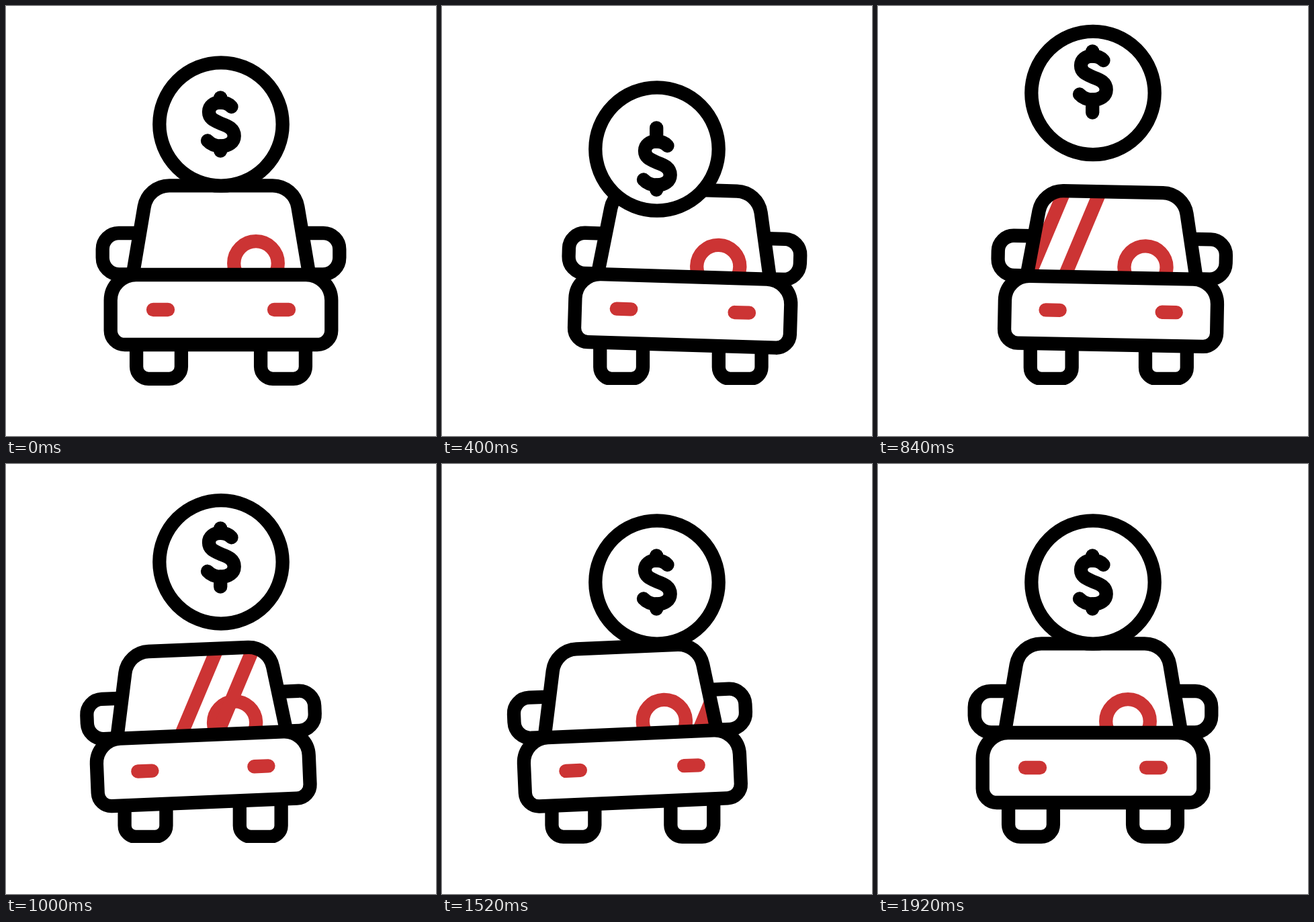
An HTML page with a canvas for the animation above (2 s loop, 640 px wide and 640 px high).

```html
<!DOCTYPE html>
<html lang="en">
<head>
<meta charset="utf-8">
<title>Car and coin</title>
<style>
html, body { margin: 0; width: 100%; height: 100%; overflow: hidden; background: #fff; }
canvas { display: block; width: 100%; height: 100%; }
</style>
</head>
<body>
<canvas id="stage" width="640" height="640"></canvas>
<script>
const ctx = document.getElementById('stage').getContext('2d');
const LOOP = 2000, STEP = 40;
const BLACK = '#000', RED = '#cc3434', WHITE = '#fff';
const LINE = 20.3;
const BASE = 504;  // height of the car's pivot
const PIVOT = -14; // tilt pivot, left of the car's middle

// Keyframes as [time, value], eased in and out between neighbours
const moves = {
  carX: [[80, 320], [640, 380.8], [1200, 260.4], [1920, 320]],
  scale: [[80, 1], [640, 0.962], [1200, 0.962], [1920, 1]],
  tilt: [[80, 0], [640, 2.9], [680, 2.9], [1200, -5], [1840, 0]],
  coin: [[80, 0], [400, 37], [820, -46.5], [840, -46.5], [1240, 0]],
  sign: [[80, 0], [400, 58], [820, -69], [840, -69], [1240, 11.3], [1480, 0]],
  topLag: [[80, 0], [400, -13], [820, 0]],
  lowLag: [[400, 0], [820, 12], [840, 12], [1240, 0]]
};

function at(keys, t) {
  if (t <= keys[0][0]) return keys[0][1];
  for (let i = 1; i < keys.length; i++) {
    const [t0, a] = keys[i - 1], [t1, b] = keys[i];
    if (t < t1) {
      const u = (t - t0) / (t1 - t0);
      return a + (b - a) * u * u * (3 - 2 * u);
    }
  }
  return keys[keys.length - 1][1];
}

function stroke(path, color = BLACK, fill) {
  if (fill) {
    ctx.fillStyle = fill;
    ctx.fill(path);
  }
  ctx.strokeStyle = color;
  ctx.lineWidth = LINE;
  ctx.stroke(path);
}

function line(x0, y0, x1, y1) {
  const p = new Path2D();
  p.moveTo(x0, y0);
  p.lineTo(x1, y1);
  return p;
}

function ring(x, y, r) {
  const p = new Path2D();
  p.arc(x, y, r, 0, Math.PI * 2);
  return p;
}

function wheels(x, s, cut) {
  const k = s * s;
  const mid = x - 63 * (1 - s);
  const half = 33.4 * k, r = 18 * k, low = 554.8;
  ctx.save();
  ctx.beginPath();
  ctx.rect(0, 0, 640, cut ? 564 : 640);
  ctx.clip();
  for (const side of [-1, 1]) {
    const c = mid + side * 92.5 * k;
    const p = new Path2D();
    p.moveTo(c - half, 503);
    p.arcTo(c - half, low, c, low, r);
    p.arcTo(c + half, low, c + half, 503, r);
    p.lineTo(c + half, 503);
    stroke(p);
  }
  ctx.restore();
}

// Car parts live in coordinates relative to the pivot; s scales shapes, not lines
function mirror(side, s) {
  const x = v => side * v * s, y = v => (v - BASE) * s;
  const p = new Path2D();
  p.moveTo(x(125), y(338));
  p.arcTo(x(176.3), y(338), x(176.3), y(368), 24 * s);
  p.arcTo(x(176.3), y(399.5), x(130), y(399.5), 25 * s);
  p.lineTo(x(130), y(399.5));
  return p;
}

function cabin(s) {
  const x = v => v * s, y = v => (v - BASE) * s;
  const p = new Path2D();
  p.moveTo(x(-131), y(398));
  p.arcTo(x(-109), y(267.3), 0, y(267.3), 38 * s);
  p.arcTo(x(109), y(267.3), x(131), y(398), 38 * s);
  p.lineTo(x(131), y(398));
  return p;
}

function body(s) {
  const p = new Path2D();
  p.roundRect(-164.3 * s, -104 * s, 328.6 * s, 104 * s,
    [38 * s, 38 * s, 21 * s, 21 * s]);
  return p;
}

// Two slanted reflections crossing the stage at constant speed
function shine(t) {
  const left = 218.4 + 0.229 * (t - 840);
  const slope = 0.42, y0 = 240, y1 = 420;
  ctx.fillStyle = RED;
  for (const x of [left, left + 53.5]) {
    const top = x + (390 - y0) * slope, low = x + (390 - y1) * slope;
    ctx.beginPath();
    ctx.moveTo(top, y0);
    ctx.lineTo(top + 22, y0);
    ctx.lineTo(low + 22, y1);
    ctx.lineTo(low, y1);
    ctx.fill();
  }
}

function car(t) {
  const x = at(moves.carX, t), s = at(moves.scale, t);
  const angle = at(moves.tilt, t) * Math.PI / 180;
  wheels(x, s, t >= 120 && t <= 1240);

  ctx.save();
  const flat = ctx.getTransform();
  ctx.translate(x + PIVOT, BASE);
  ctx.rotate(angle);
  ctx.translate(-PIVOT, 0);
  stroke(mirror(-1, s));
  stroke(mirror(1, s));
  const shell = cabin(s);
  ctx.fillStyle = WHITE;
  ctx.fill(shell);

  ctx.save();
  ctx.clip(shell);
  stroke(ring(52 * s, -121 * s, 32.8 * s), RED);
  ctx.setTransform(flat);
  shine(t);
  ctx.restore();

  stroke(shell);
  stroke(body(s), BLACK, WHITE);
  for (const side of [-1, 1]) {
    const c = side * 90 * s, y = -52 * s;
    stroke(line(c - 11 * s, y, c + 11 * s, y), RED);
  }
  ctx.restore();
}

function dollar(t) {
  const dy = at(moves.sign, t);
  const p = new Path2D();
  p.moveTo(335.5, 150);
  p.bezierCurveTo(331, 145, 326, 143.5, 319, 143.5);
  p.bezierCurveTo(309, 143.5, 302, 149, 302, 157.5);
  p.bezierCurveTo(302, 168, 311, 171, 320, 175);
  p.bezierCurveTo(331, 179, 339.7, 183, 339.7, 193.5);
  p.bezierCurveTo(339.7, 203, 331, 208.5, 320, 208.5);
  p.bezierCurveTo(311, 208.5, 305, 206, 300, 200.5);
  ctx.save();
  ctx.translate(0, dy);
  stroke(p);
  stroke(line(319.2, 136.4 + at(moves.topLag, t), 319.2, 143.5));
  stroke(line(319.2, 215.6 + at(moves.lowLag, t), 319.2, 208.5));
  ctx.restore();
}

function draw(t) {
  ctx.fillStyle = WHITE;
  ctx.fillRect(0, 0, 640, 640);
  ctx.lineCap = 'round';
  ctx.lineJoin = 'round';
  car(t);
  stroke(ring(320, 176 + at(moves.coin, t), 91.7), BLACK, WHITE);
  dollar(t);
}

const start = performance.now();
function tick() {
  const t = (performance.now() - start) % LOOP;
  draw(Math.floor(t / STEP) * STEP);
  requestAnimationFrame(tick);
}
tick();
</script>
</body>
</html>
```
